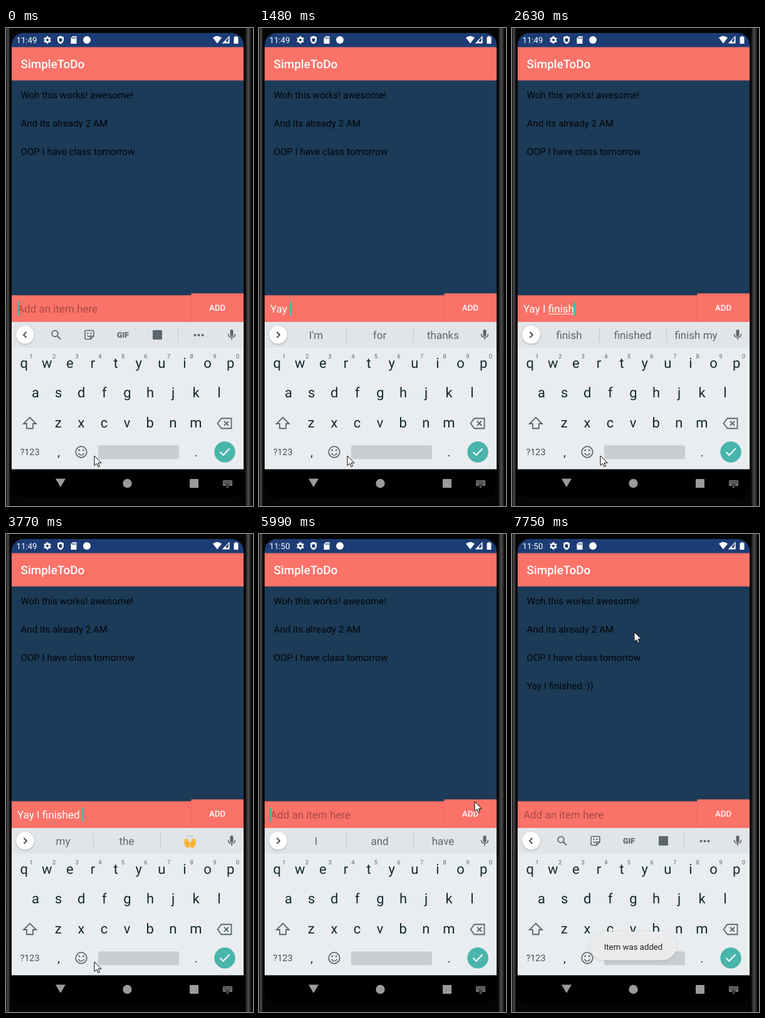
Write an HTML page with a canvas that moves like this. It is 394 px wide and 761 px high and loops after 8000 ms.

```html
<!DOCTYPE html>
<html lang="en">
<head>
<meta charset="utf-8">
<title>To-do list demo</title>
<style>
html, body { margin: 0; width: 100%; height: 100%; overflow: hidden; background: #000; }
canvas { display: block; width: 394px; height: 761px; }
</style>
</head>
<body>
<canvas id="stage"></canvas>
<script>
const W = 394, H = 761, LOOP = 8000, DP = 0.9455;
const CORAL = '#fb7268', NAVY = '#1c3b58', TEAL = '#4ab5ab', INK = '#14282f', GREY = '#5b676d';
const canvas = document.getElementById('stage');
const c = canvas.getContext('2d');
const ratio = window.devicePixelRatio || 1;
canvas.width = W * ratio;
canvas.height = H * ratio;
c.textRendering = 'geometricPrecision';

// Typing steps: time, text, start of the underlined word (-1: none), suggestions (null: toolbar)
const typing = [
  [0, '', -1, null],
  [650, 'Y', 0, ['Y', 'You', 'Yes']],
  [1050, 'Ya', 0, ['Ya', 'Yay', 'Yes']],
  [1200, 'Yay', 0, ['Yay', 'Yays', 'Yay!']],
  [1480, 'Yay ', -1, ["I'm", 'for', 'thanks']],
  [1790, 'Yay I', 4, ['I', "I'm", "I'll"]],
  [1940, 'Yay I ', -1, ['have', 'am', 'was']],
  [2070, 'Yay I f', 6, ['f', 'for', 'from']],
  [2200, 'Yay I fi', 6, ['fi', 'find', 'first']],
  [2350, 'Yay I fin', 6, ['fin', 'find', 'fine']],
  [2480, 'Yay I fini', 6, ['fini', 'finish', 'finished']],
  [2630, 'Yay I finish', 6, ['finish', 'finished', 'finish my']],
  [2750, 'Yay I finishe', 6, ['finishe', 'finished', 'finishes']],
  [2910, 'Yay I finished', 6, ['finish', 'finished', drawFlag]],
  [3770, 'Yay I finished ', -1, ['my', 'the', drawHands]],
  [4210, 'Yay I finished :', -1, ['the', 'I', 'my']],
  [4510, 'Yay I finished :)', -1, ['I', 'and', 'have']],
  [4660, 'Yay I finished :))', -1, ['I', 'and', 'have']],
  [5990, '', -1, ['I', 'and', 'have']],
  [6150, '', -1, null]
];
const pointer = [
  [0, 141, 681], [5090, 165, 645], [5240, 235, 500], [5370, 320, 290], [5500, 381, 175],
  [5620, 374, 235], [5740, 358, 345], [5870, 346, 412], [5990, 344, 426],
  [6560, 328, 400], [6700, 285, 345], [6820, 235, 290], [6960, 206, 245],
  [7240, 202, 215], [7370, 198, 185], [7500, 196, 160], [7620, 194, 146], [7750, 195, 156]
];
const caretOff = [[370, 650], [3490, 3770], [5240, 5740], [6560, 7240], [7620, 8000]];

const at = (steps, t) => steps.findLast(step => step[0] <= t);

function rect(x, y, w, h, color, r = 0) {
  c.fillStyle = color;
  c.beginPath();
  c.roundRect(x, y, w, h, r);
  c.fill();
}
function disc(x, y, r, color) {
  c.fillStyle = color;
  c.beginPath();
  c.arc(x, y, r, 0, 7);
  c.fill();
}
function ring(x, y, r, color, width) {
  c.strokeStyle = color;
  c.lineWidth = width;
  c.beginPath();
  c.arc(x, y, r, 0, 7);
  c.stroke();
}
function shape(d, x, y, color, lineWidth = 0) {
  const path = new Path2D(d);
  c.save();
  c.translate(x, y);
  if (lineWidth) {
    c.strokeStyle = color;
    c.lineWidth = lineWidth;
    c.stroke(path);
  } else {
    c.fillStyle = color;
    c.fill(path);
  }
  c.restore();
}
function text(s, x, y, size, color, align = 'left', weight = 400) {
  c.font = `${weight} ${size}px Roboto, sans-serif`;
  c.fillStyle = color;
  c.textAlign = align;
  c.fillText(s, x, y);
}

function drawEdge(x, w) {
  const metal = c.createLinearGradient(x, 0, x + w, 0);
  metal.addColorStop(0, '#141414');
  metal.addColorStop(.5, '#4c4c4c');
  metal.addColorStop(1, '#141414');
  rect(x, 0, w, H, metal);
}

function drawPhone() {
  rect(0, 0, W, H, '#050505');
  drawEdge(0, 6);
  drawEdge(382, 9);
  rect(9, 8, 370, 740, '#000', 20);
}

function drawStatus(clock) {
  rect(9, 8, 370, 23, '#1d3c75', [19, 19, 0, 0]);
  text(clock, 16.5, 24, 14 * DP, '#fff');
  disc(66, 19, 4.7, '#fff');
  for (let i = 0; i < 6; i++) {
    const a = i * Math.PI / 3 + Math.PI / 6;
    disc(66 + 4.8 * Math.cos(a), 19 + 4.8 * Math.sin(a), 1.4, '#fff');
  }
  disc(66, 19, 2, '#1d3c75');
  shape('M0-6.5L5-4.5V0Q5 4 0 6.5Q-5 4-5 0V-4.5Z', 87, 19, '#fff');
  shape('M0-3L2.6-1.8V.5Q2.4 2.5 0 3.6Q-2.4 2.5-2.6 .5V-1.8Z', 87, 19, '#1d3c75');
  shape('M-1.5-6H4.5V6H-4.5V-3Z', 108, 19, '#fff');
  [105.6, 107.8, 110].forEach(x => rect(x, 14.5, 1.1, 3, '#1d3c75'));
  disc(129, 19, 6, '#fff');
  shape('M0 5.5L-7-3.5Q0-9 7-3.5Z', 337, 19, '#fff');
  shape('M5-5.5V5H-5Z', 351, 19, '#fff', 1.1);
  shape('M5-5.5V5H-5L0 0V3H3Z', 351, 19, '#fff');
  shape('M-1.5-6H1.5V-4.7H3.5V6H-3.5V-4.7H-1.5Z', 367, 19, '#fff');
}

function drawList(t) {
  rect(9, 83, 370, 343, NAVY);
  rect(9, 30.4, 370, 53, CORAL);
  text('SimpleToDo', 23.5, 64, 20 * DP, '#fff', 'left', 500);
  const items = ['Woh this works! awesome!', 'And its already 2 AM', 'OOP I have class tomorrow'];
  if (t >= 6150) items.push('Yay I finished :))');
  items.forEach((item, i) => text(item, 23.5, 111.5 + i * 45.2, 16 * DP, '#020406'));
}

function drawInput(t, value, mark) {
  const size = 18 * DP, y = 453.3;
  rect(9, 425.5, 370, 42.5, CORAL);
  c.save();
  c.beginPath();
  c.rect(9, 415, 370, 53);
  c.clip();
  c.shadowColor = 'rgba(70,0,0,.3)';
  c.shadowBlur = 2 * ratio;
  rect(295.5, 422.5, 84, 46, CORAL);
  c.restore();
  text('ADD', 337, 450.3, 14 * DP, '#fff', 'center', 500);
  text(value || 'Add an item here', 18, y, size, value ? '#fff' : '#a64b46');
  const end = 18 + (value ? c.measureText(value).width : 0);
  if (mark >= 0) {
    const start = 18 + c.measureText(value.slice(0, mark)).width;
    rect(start, 455, end - start, 1, '#fff');
  }
  if (!caretOff.some(([from, to]) => t >= from && t < to)) rect(end, 435.5, 2.4, 22.5, '#2fc2b1');
}

function drawFlag(x, y) {
  rect(x - 9, y - 9, 1.6, 19, '#8b5b3d');
  rect(x - 7, y - 8, 16, 12, '#fff');
  for (let i = 0; i < 12; i++) {
    if ((i + (i >> 2)) % 2 === 0) rect(x - 7 + i % 4 * 4, y - 8 + (i >> 2) * 4, 4, 4, '#333');
  }
}

function drawHands(x, y) {
  for (const side of [-1, 1]) {
    c.save();
    c.translate(x + side * 5.2, y + 3);
    c.scale(side, 1);
    c.rotate(.2);
    shape('M-3.5-3H3.5Q4.5 2 1.5 7H-3.5Q-4.5 2-3.5-3Z', 0, 0, '#f9b434');
    [-3.4, -1.6, .2, 2].forEach((fx, i) => rect(fx, i % 3 ? -8 : -6.5, 1.5, 8, '#f9b434', .7));
    shape('M-3 3L-5.5-1', 0, 0, '#f9b434', 1.8);
    c.restore();
    shape(`M${side}-10L${side * 2}-7.5M${side * 4}-10V-8`, x, y, '#8dafc6', 1);
  }
}

function drawToolbar() {
  ring(78, 486.5, 4.8, GREY, 1.8);
  shape('M3.5 3.5L9 9', 78, 486.5, GREY, 2);
  shape('M-5-7H5Q7-7 7-5V2L2 7H-5Q-7 7-7 5V-5Q-7-7-5-7M7 2H3Q2 2 2 3V7', 133, 488.5, GREY, 1.6);
  disc(130.5, 486, 1.2, GREY);
  disc(135.5, 486, 1.2, GREY);
  shape('M-3.5 1Q-1 4.5 2.5 1', 133, 488.5, GREY, 1.4);
  text('GIF', 186.5, 493, 12.5, GREY, 'center', 900);
  rect(234, 481, 15, 15, GREY, 1);
  rect(274, 477, 1, 22, '#c3c8cb');
  [301.5, 307.5, 313.5].forEach(x => disc(x, 489, 2, GREY));
}

function drawSuggestions(words) {
  rect(139, 477, 1, 23, '#c3c8cb');
  rect(246, 477, 1, 23, '#c3c8cb');
  words.forEach((word, i) => {
    const x = [91, 192.5, 293.5][i];
    if (typeof word === 'function') word(x, 489.5);
    else text(word, x, 495, 18 * DP, GREY, 'center');
  });
}

function drawStrip(words) {
  rect(9, 468, 370, 41, '#e1e5e7');
  c.save();
  c.shadowColor = 'rgba(0,0,0,.25)';
  c.shadowBlur = 3 * ratio;
  c.shadowOffsetY = ratio;
  disc(30.5, 488.3, 14.3, '#fff');
  c.restore();
  shape(words ? 'M-2-4.5L2.5 0L-2 4.5' : 'M2-4.5L-2.5 0L2 4.5', 30.5, 488.5, '#3f484d', 1.8);
  if (words) drawSuggestions(words);
  else drawToolbar();
  rect(357.5, 480, 5, 11, GREY, 2.5);
  shape('M-5.5-1Q-5.5 4.5 0 4.5Q5.5 4.5 5.5-1M0 4.5V8.5', 360, 488, GREY, 1.5);
}

function drawKeys() {
  rect(9, 509, 370, 193.5, '#e9edf0');
  const rows = [['qwertyuiop', 28.7, 540.8], ['asdfghjkl', 47, 587.8], ['zxcvbnm', 83.3, 635.5]];
  rows.forEach(([keys, x, y]) =>
    [...keys].forEach((key, i) => text(key, x + i * 36.6, y, 22, INK, 'center')));
  [...'1234567890'].forEach((key, i) => text(key, 40 + i * 36.6, 525.5, 9.5, GREY, 'center'));

  shape('M0-9L10 1H5V8.5H-5V1H-10Z', 38, 629, GREY, 1.8);
  shape('M-5-8H11V8H-5L-11 0ZM-.5-3.5L6.5 3.5M6.5-3.5L-.5 3.5', 348.5, 629.5, GREY, 1.8);
  text('?123', 38, 680.3, 14.4, '#435057', 'center');
  text(',', 84, 681.5, 19, INK, 'center');
  text('.', 303, 682, 19, INK, 'center');
  ring(120, 675, 8.8, GREY, 1.7);
  disc(116.8, 672.2, 1.4, GREY);
  disc(123.2, 672.2, 1.4, GREY);
  shape('M-4.7 2Q0 8 4.7 2', 120, 675, GREY, 1.6);
  rect(147, 664.5, 129, 22, '#c9cdd0', 3);
  disc(349, 675, 16.7, TEAL);
  shape('M-7.5 0L-2.5 5L7.5-5.5', 349, 675, '#fff', 2);
}

function drawNav() {
  const color = '#9b9b9b';
  shape('M-8-6.5H8L0 7Z', 87, 724, color);
  disc(193.5, 725, 7.2, color);
  rect(293, 718, 14, 14, color, 1);
  rect(346, 720, 15, 9, '#777', 1);
  for (let i = 0; i < 10; i++) rect(347.5 + i % 5 * 2.6, 721.5 + (i / 5 | 0) * 2.5, 1.4, 1.2, '#000');
  rect(350, 726.6, 7, 1.2, '#000');
  shape('M-2.5 0H2.5L0 2.5Z', 353.5, 730, '#777');
}

function drawToast(t) {
  const alpha = Math.min(1, Math.max(0, (t - 6150) / 450));
  if (!alpha) return;
  c.save();
  c.globalAlpha = alpha;
  c.save();
  c.shadowColor = 'rgba(0,0,0,.13)';
  c.shadowBlur = 4 * ratio;
  c.shadowOffsetY = ratio;
  rect(124.5, 633, 138, 45.5, '#ebebec', 22.7);
  c.restore();
  text('Item was added', 193.5, 662, 14 * DP, '#222', 'center');
  c.restore();
}

function drawPointer(x, y) {
  const arrow = 'M0 0V15.5L3.6 12.2L6 17.5L8.4 16.4L6.1 11.3H11Z';
  shape(arrow, x, y, '#fff');
  shape(arrow, x, y, '#000', 1);
}

function draw(t) {
  const [, value, mark, words] = at(typing, t);
  const [, x, y] = at(pointer, t);
  c.setTransform(ratio, 0, 0, ratio, 0, 0);
  drawPhone();
  drawStatus(t < 3920 ? '11:49' : '11:50');
  drawList(t);
  drawInput(t, value, mark);
  drawStrip(words);
  drawKeys();
  drawNav();
  drawToast(t);
  drawPointer(x, y);
}

const started = performance.now();
function tick() {
  draw((performance.now() - started) % LOOP);
  requestAnimationFrame(tick);
}
tick();
</script>
</body>
</html>
```
